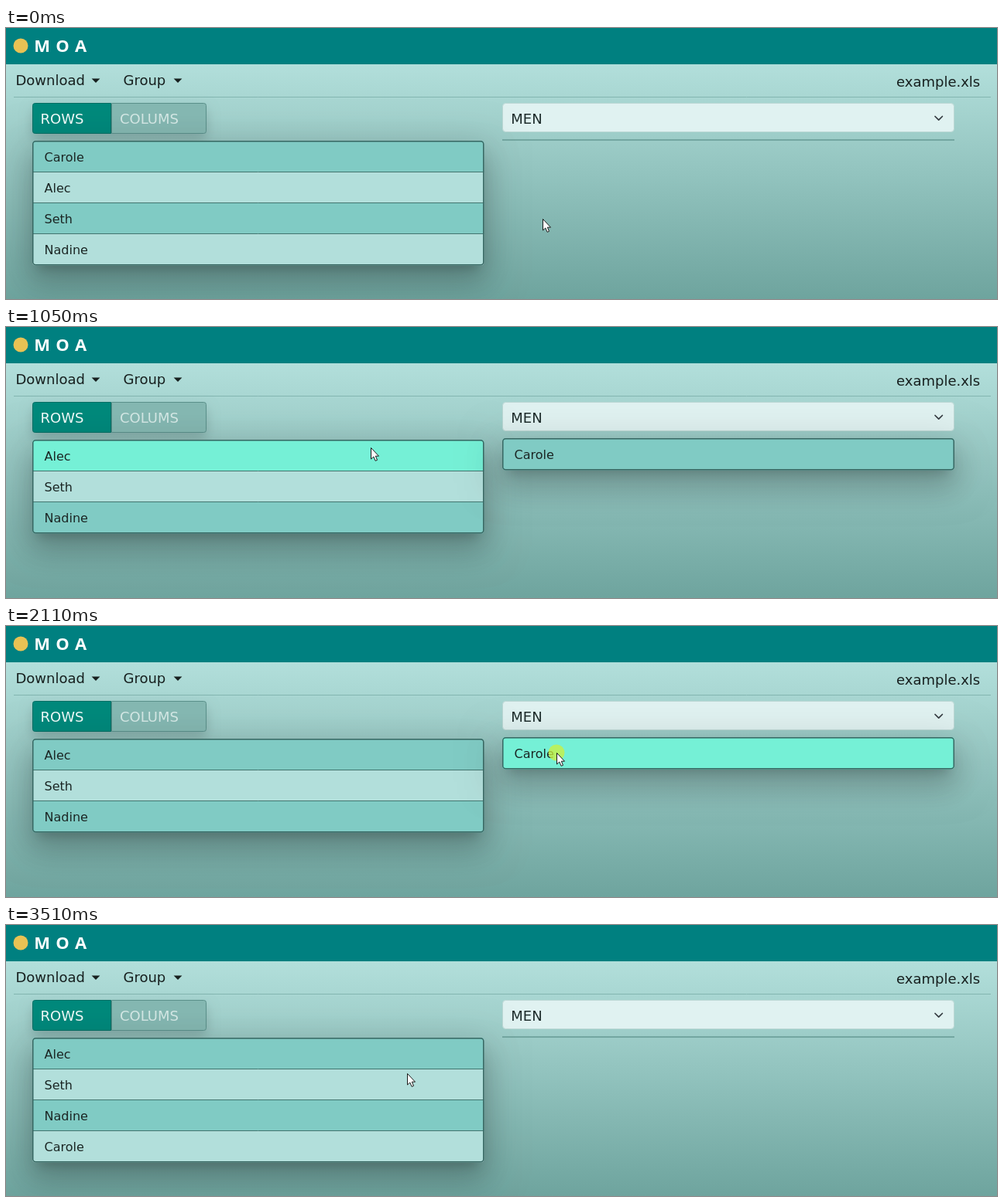
An HTML page with a canvas for the animation above (3.56 s loop, 1280 by 351 pixels).

```html
<!DOCTYPE html>
<html lang="en">
<head>
<meta charset="utf-8">
<title>MOA</title>
<style>
  html, body { margin: 0; width: 100%; height: 100%; overflow: hidden; background: #008080; }
  canvas { display: block; }
</style>
</head>
<body>
<canvas id="stage" width="1280" height="351"></canvas>
<script>
const ctx = document.getElementById('stage').getContext('2d');
const LOOP = 3560;
const SANS = '"DejaVu Sans", sans-serif';
const INK = '#17201f';
const EDGE = '#376762';
const ODD = [128, 203, 196];
const EVEN = [178, 223, 219];
const HOVER = [117, 240, 214];

const START = ['Carole', 'Alec', 'Seth', 'Nadine'];
const MOVED = START.slice(1);
const RETURNED = [...MOVED, START[0]];

// Each step holds until the next: at, pointer x and y, left and right hover strength.
const STEPS = [
  { at: 0, x: 693, y: 247, left: 0, right: 0 },
  { at: 130, x: 585, y: 173, left: 0.25, right: 0 },
  { at: 270, x: 490, y: 160, left: 0.9, right: 0 },
  { at: 390, x: 471, y: 157, left: 1, right: 0 },
  { at: 530, x: 471, y: 156, left: 1, right: 0 },
  { at: 790, x: 471, y: 156, left: 0, right: 0 },
  { at: 930, x: 471, y: 156, left: 0.85, right: 0 },
  { at: 1050, x: 471, y: 156, left: 1, right: 0 },
  { at: 1190, x: 630, y: 162, left: 0.4, right: 0 },
  { at: 1310, x: 704, y: 166, left: 0, right: 0.1, beam: true },
  { at: 1450, x: 670, y: 166, left: 0, right: 1, beam: true },
  { at: 1590, x: 711, y: 164, left: 0, right: 1 },
  { at: 2110, x: 711, y: 164, left: 0, right: 1, press: true },
  { at: 2230, x: 711, y: 164, left: 0, right: 0 },
  { at: 2510, x: 632, y: 163, left: 0, right: 0 },
  { at: 2630, x: 517, y: 162, left: 0.15, right: 0 },
  { at: 2790, x: 517, y: 162, left: 0.9, right: 0 },
  { at: 2910, x: 517, y: 162, left: 1, right: 0 },
  { at: 3440, x: 518, y: 191, left: 0.4, right: 0 },
  { at: 3510, x: 518, y: 192, left: 0, right: 0 }
];

function mix(a, b, k) {
  return `rgb(${a.map((v, i) => Math.round(v + (b[i] - v) * k)).join(',')})`;
}

function text(str, x, y, size = 18, color = INK) {
  ctx.font = `${size}px ${SANS}`;
  ctx.fillStyle = color;
  ctx.fillText(str, x, y);
}

function box(x, y, w, h, radii, fill, stroke, line = 1) {
  ctx.beginPath();
  ctx.roundRect(x, y, w, h, radii);
  if (fill) {
    ctx.fillStyle = fill;
    ctx.fill();
  }
  if (stroke) {
    ctx.strokeStyle = stroke;
    ctx.lineWidth = line;
    ctx.stroke();
  }
}

// Casts only the shadow: the casting shape stays outside the stage.
function shadow(x, y, w, h, dy, blur, spread, alpha) {
  const away = 3000;
  ctx.save();
  ctx.shadowColor = `rgba(0,0,0,${alpha})`;
  ctx.shadowBlur = blur;
  ctx.shadowOffsetX = away;
  ctx.shadowOffsetY = dy;
  box(x - spread - away, y - spread, w + 2 * spread, h + 2 * spread, 4, '#000');
  ctx.restore();
}

function polyline(points, stroke, line) {
  ctx.beginPath();
  points.forEach(([x, y]) => ctx.lineTo(x, y));
  ctx.strokeStyle = stroke;
  ctx.lineWidth = line;
  ctx.stroke();
}

function disc(x, y, r, fill) {
  ctx.beginPath();
  ctx.arc(x, y, r, 0, Math.PI * 2);
  ctx.fillStyle = fill;
  ctx.fill();
}

function caret(x, y) {
  ctx.beginPath();
  ctx.moveTo(x - 5.4, y);
  ctx.lineTo(x + 5.4, y);
  ctx.lineTo(x, y + 5.4);
  ctx.fillStyle = INK;
  ctx.fill();
}

function backdrop() {
  const shade = ctx.createLinearGradient(0, 47, 0, 351);
  shade.addColorStop(0, '#b2dfdb');
  shade.addColorStop(1, '#6ea49e');
  ctx.fillStyle = shade;
  ctx.fillRect(0, 47, 1280, 304);
  ctx.fillStyle = '#008080';
  ctx.fillRect(0, 0, 1280, 47);
}

function header() {
  disc(19, 23, 9.5, '#e8c254');
  ctx.font = '600 22px "Noto Sans", sans-serif';
  ctx.fillStyle = '#fff';
  ctx.textAlign = 'center';
  [['M', 46.5], ['O', 73], ['A', 96.5]].forEach(([c, x]) => ctx.fillText(c, x, 31));
  ctx.textAlign = 'left';

  text('Download', 12.4, 74);
  caret(116, 65.5);
  text('Group', 151.5, 74);
  caret(222, 65.5);
  text('example.xls', 1150, 76);
  polyline([[10, 89.5], [1272, 89.5]], '#83b5b0', 1);
}

function controls() {
  shadow(34, 97, 225, 40, 8, 16, 0, 0.17);
  box(136.5, 97.5, 122, 39, [0, 3, 3, 0], '#85b8b2', '#5b918b');
  box(34.5, 97.5, 101, 39, [3, 0, 0, 3], '#00897b', '#046e64');
  text('ROWS', 44.6, 124, 18, '#f2fbfa');
  text('COLUMS', 147, 124, 18, '#d5e9e6');

  box(641.5, 97.5, 583, 37, 4, '#e0f2f1', '#bcd8d5');
  text('MEN', 652.3, 124, 18, '#1c2b2a');
  ctx.lineCap = ctx.lineJoin = 'round';
  polyline([[1200, 114.5], [1204.7, 119.2], [1209.4, 114.5]], '#343a40', 1.7);
  ctx.lineCap = 'butt';
  ctx.lineJoin = 'miter';
}

function list(names, x, y, w, hover) {
  const pitch = 40;
  const h = pitch * names.length + 1.5;
  shadow(x, y, w, h, 24, 38, 3, 0.14);
  shadow(x, y, w, h, 9, 46, 8, 0.12);
  shadow(x, y, w, h, 11, 15, -7, 0.2);

  ctx.save();
  ctx.beginPath();
  ctx.roundRect(x, y, w, h, 4);
  ctx.clip();
  names.forEach((name, i) => {
    const top = y + i * pitch;
    ctx.fillStyle = mix(i % 2 ? EVEN : ODD, HOVER, i ? 0 : hover);
    ctx.fillRect(x, top, w, pitch + 2);
    if (i) polyline([[x, top + 0.5], [x + w, top + 0.5]], '#42756f', 1);
    text(name, x + 15.6, top + 27, 16, '#1b2624');
  });
  ctx.restore();
  box(x + 0.75, y + 0.75, w - 1.5, h - 1.5, 3.5, null, EDGE, 1.5);
}

function arrow(x, y) {
  ctx.save();
  ctx.translate(x + 0.5, y + 0.5);
  ctx.beginPath();
  [[0, 0], [0, 14.5], [3.3, 11.5], [5.6, 16.8], [8, 15.8], [5.8, 10.7], [10, 10.7]]
    .forEach(([px, py]) => ctx.lineTo(px, py));
  ctx.closePath();
  ctx.fillStyle = '#fff';
  ctx.fill();
  ctx.strokeStyle = '#1a1a1a';
  ctx.lineWidth = 1;
  ctx.stroke();
  ctx.restore();
}

function beam(x, y) {
  const tone = 'rgba(50,60,58,0.75)';
  polyline([[x + 0.5, y - 6], [x + 0.5, y + 6]], tone, 1);
  [-6.5, 6.5].forEach(dy => polyline([[x - 2.5, y + dy], [x + 3.5, y + dy]], tone, 1));
}

function draw(t) {
  const step = STEPS.findLast(s => s.at <= t);
  const picked = t >= 790 && t < 2230;
  const names = t < 790 ? START : picked ? MOVED : RETURNED;

  backdrop();
  header();
  controls();
  list(names, 34, 146, 583.5, step.left);
  if (picked) list([START[0]], 641, 144, 584, step.right);
  else polyline([[641, 145], [1225, 145]], '#4d827d', 1.2);

  if (step.press) disc(711, 164, 10.5, 'rgba(205,240,60,0.75)');
  (step.beam ? beam : arrow)(step.x, step.y);
}

function tick() {
  draw(performance.now() % LOOP);
  requestAnimationFrame(tick);
}
tick();
</script>
</body>
</html>
```
